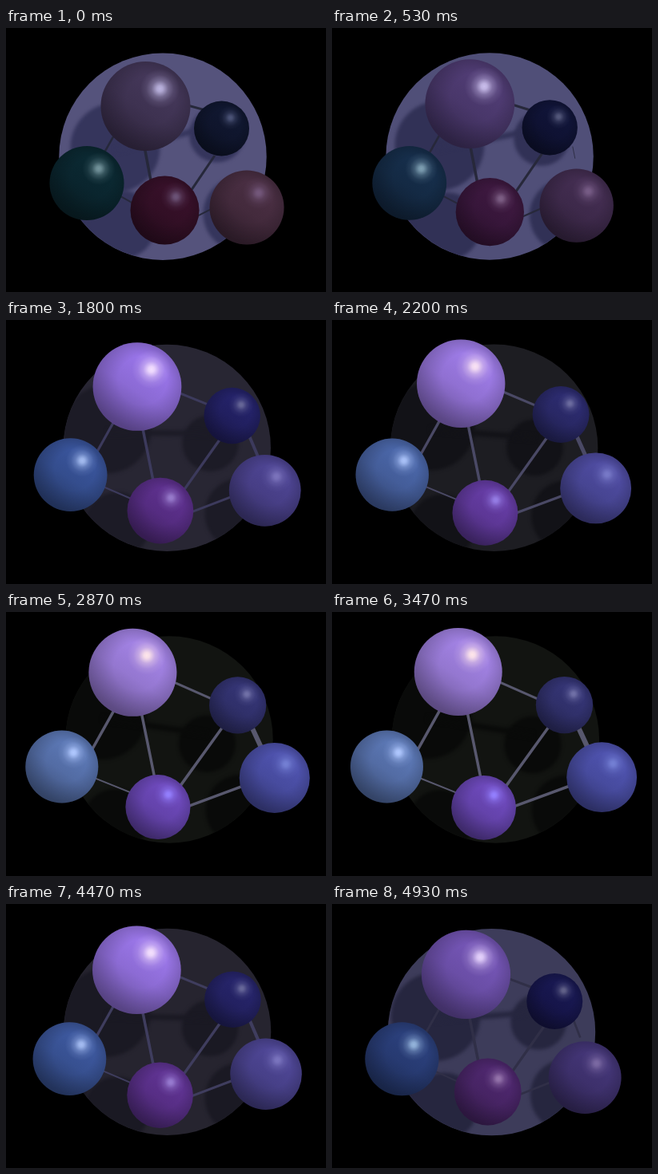
Recreate the animation shown at these times as an HTML page with a canvas. Size 400 by 331 pixels, loop 4990 ms.

```html
<!DOCTYPE html>
<html lang="en">
<head>
<meta charset="utf-8">
<title>Ball and rod lattice</title>
<style>
html, body { margin: 0; width: 100%; height: 100%; overflow: hidden; background: #000; }
canvas { display: block; }
</style>
</head>
<body>
<canvas id="stage" width="400" height="331"></canvas>
<script>
const ctx = document.getElementById('stage').getContext('2d');
const LOOP = 4990, STEP = 1000 / 15;

// Seconds and horizontal reach of the swing; it jumps back at the loop's end.
const SWING = [[0, 54], [0.5, 50.3], [1, 45], [1.6, 37.3], [2.2, 29.5],
  [2.87, 24.3], [3.4, 22.9], [4, 26.7], [4.93, 41]];

// Swing positions at which the palettes below apply.
const STOPS = [0, 0.305, 0.66, 1];

const palette = text => text.split(' ').map(h =>
  [1, 3, 5].map(i => parseInt(h.slice(i, i + 2), 16)));

const mix = (a, b, k) => a + (b - a) * k;
const mixAll = (a, b, k) => a.map((v, i) => mix(v, b[i], k));

function tint(list, q, gain = 1) {
  const x = Math.min(1, Math.max(0, q));
  let i = 0;
  while (i < STOPS.length - 2 && x > STOPS[i + 1]) i++;
  const k = (x - STOPS[i]) / (STOPS[i + 1] - STOPS[i]);
  return mixAll(list[i], list[i + 1], k).map(v => Math.min(255, Math.round(v * gain)));
}

const rgba = (c, a = 1) => `rgba(${c.join(',')},${a})`;

const floor = palette('#55537c #4a4972 #282633 #121411');
const shade = palette('#35355c #2c2c4e #1c1b26 #090a09');
const rodTint = palette('#26283a #28283a #3c3a5c #58586e');

// from/to: x, y, radius at both ends of the swing; drop/dropTo: shadow offsets.
const balls = [
  { from: [269.5, 126, 34.5], to: [289.5, 117, 35.6], drop: [-6, 8], dropTo: [-38, 48],
    body: palette('#0e142a #0f0f3a #201e5c #2e2e66'),
    glow: palette('#4c5478 #606080 #686898 #7272a8') },
  { from: [101, 194.5, 46.5], to: [70, 194, 45.5], drop: [-20, 24], dropTo: [-20, 24],
    body: palette('#0a242c #1e2d5c #324a88 #50689e'),
    glow: palette('#74949c #8cb0d0 #a4bcf0 #b0c8ff') },
  { from: [174.5, 98, 56], to: [158.5, 76, 55], drop: [-38, 52], dropTo: [-38, 54],
    body: palette('#3c304e #523a84 #8666cc #8e72c8'),
    glow: palette('#bcb4e0 #dccafa #f4e0ff #ffe6ea') },
  { from: [301, 225, 46.5], to: [335.5, 208, 44], drop: [-8, 8], dropTo: [-42, 40],
    body: palette('#40283a #352658 #443c80 #444898'),
    glow: palette('#74587c #7c6494 #7c74bc #7480d4') },
  { from: [198.5, 228.5, 43], to: [190, 244.5, 40.5], drop: [-54, 18], dropTo: [-54, 18],
    body: palette('#300e24 #3c1e50 #522a7c #6040a4'),
    glow: palette('#6c5478 #947098 #987ccc #9480ff') }
];

// x1, y1, x2, y2 of each visible rod early and late, then both widths.
const rods = [
  [[224, 95, 255, 106], [212, 89, 262, 111], [3, 3]],
  [[134, 133, 120, 158], [133, 127, 109, 170], [2.5, 3.5]],
  [[173, 148, 182, 194], [170, 130, 185, 204], [3.5, 3.5]],
  [[262, 158, 228, 207], [271, 144, 220, 215], [3, 3.5]],
  [[135, 211, 160, 223], [113, 209, 155, 226], [2, 2]],
  [[236, 238, 265, 226], [229, 243, 294, 219], [2, 3.5]],
  [[303, 152, 306, 161], [308, 146, 319, 170], [0, 6]]
];

function disc(x, y, r, fill) {
  ctx.fillStyle = fill;
  ctx.beginPath();
  ctx.arc(x, y, r, 0, Math.PI * 2);
  ctx.fill();
}

function line(x1, y1, x2, y2, width, color) {
  if (width < 0.1) return;
  ctx.strokeStyle = color;
  ctx.lineWidth = width;
  ctx.beginPath();
  ctx.moveTo(x1, y1);
  ctx.lineTo(x2, y2);
  ctx.stroke();
}

function drawFloor(q, spots) {
  const x = mix(196, 204, q), y = mix(161.2, 160, q);
  disc(x, y, 129.7, rgba(tint(floor, q)));
  ctx.save();
  ctx.beginPath();
  ctx.arc(x, y, 129.5, 0, Math.PI * 2);
  ctx.clip();
  ctx.filter = 'blur(2px)';
  const dark = rgba(tint(shade, q));
  const cast = balls.map((b, i) => {
    const [dx, dy] = mixAll(b.drop, b.dropTo, q);
    const [bx, by, r] = spots[i];
    return [bx + dx, by + dy, r];
  });
  cast.forEach(s => disc(...s, dark));
  line(cast[2][0], cast[2][1] + 4, cast[0][0], cast[0][1] - 12, 7, dark);
  ctx.restore();
}

function drawRods(q) {
  const color = rgba(tint(rodTint, q));
  const k = (q - STOPS[1]) / (1 - STOPS[1]);
  for (const [early, late, width] of rods) {
    const [x1, y1, x2, y2] = mixAll(early, late, k);
    const len = Math.hypot(x2 - x1, y2 - y1) || 1;
    const ex = (x2 - x1) / len * 5, ey = (y2 - y1) / len * 5;
    line(x1 - ex, y1 - ey, x2 + ex, y2 + ey, mix(...width, q), color);
  }
}

function drawBall(ball, [x, y, r], q) {
  const dx = -0.55 * r, dy = 0.83 * r;
  const body = ctx.createLinearGradient(x - dx, y - dy, x + dx, y + dy);
  [[0.2, 1.14], [0.55, 1.04], [0.95, 0.78]].forEach(([at, gain]) =>
    body.addColorStop(at, rgba(tint(ball.body, q, gain))));
  disc(x, y, r, body);

  const rim = ctx.createRadialGradient(x + r * 0.12, y - r * 0.14, r * 0.55, x, y, r);
  rim.addColorStop(0, 'rgba(0,0,0,0)');
  rim.addColorStop(1, 'rgba(0,0,0,0.18)');
  disc(x, y, r, rim);

  const hx = x + r * 0.32, hy = y - r * 0.39, c = tint(ball.glow, q);
  const shine = ctx.createRadialGradient(hx, hy, 0, hx, hy, r * 0.44);
  [[0, 1], [0.15, 0.9], [0.42, 0.4], [0.7, 0.12], [1, 0]].forEach(([at, a]) =>
    shine.addColorStop(at, rgba(c, a)));
  disc(hx, hy, r * 0.44, shine);
}

const slope = (a, b) => (b[1] - a[1]) / (b[0] - a[0]);

// Smooth curve through the swing points, returned as 0 (start) to about 1 (far end).
function swing(sec) {
  const last = SWING.length - 1;
  let i = 0;
  while (i < last - 1 && sec > SWING[i + 1][0]) i++;
  const a = SWING[i], b = SWING[i + 1], span = b[0] - a[0];
  const ma = slope(SWING[Math.max(0, i - 1)], b) * span;
  const mb = slope(a, SWING[Math.min(last, i + 2)]) * span;
  const u = (sec - a[0]) / span, v = 1 - u;
  const reach = a[1] * v * v * (1 + 2 * u) + b[1] * u * u * (1 + 2 * v)
    + ma * u * v * v - mb * u * u * v;
  return (54 - reach) / 29.5;
}

function draw(now) {
  const tickNo = Math.floor((now % LOOP + 5) / STEP);
  const q = swing(Math.min(74, tickNo) * STEP / 1000);
  const spots = balls.map(b => mixAll(b.from, b.to, q));
  ctx.fillStyle = '#000';
  ctx.fillRect(0, 0, 400, 331);
  drawFloor(q, spots);
  drawRods(q);
  balls.forEach((b, i) => drawBall(b, spots[i], q));
}

let start = null;
function tick(now) {
  if (start === null) start = now;
  draw(Math.max(0, now - start));
  requestAnimationFrame(tick);
}
draw(0);
requestAnimationFrame(tick);
</script>
</body>
</html>
```
